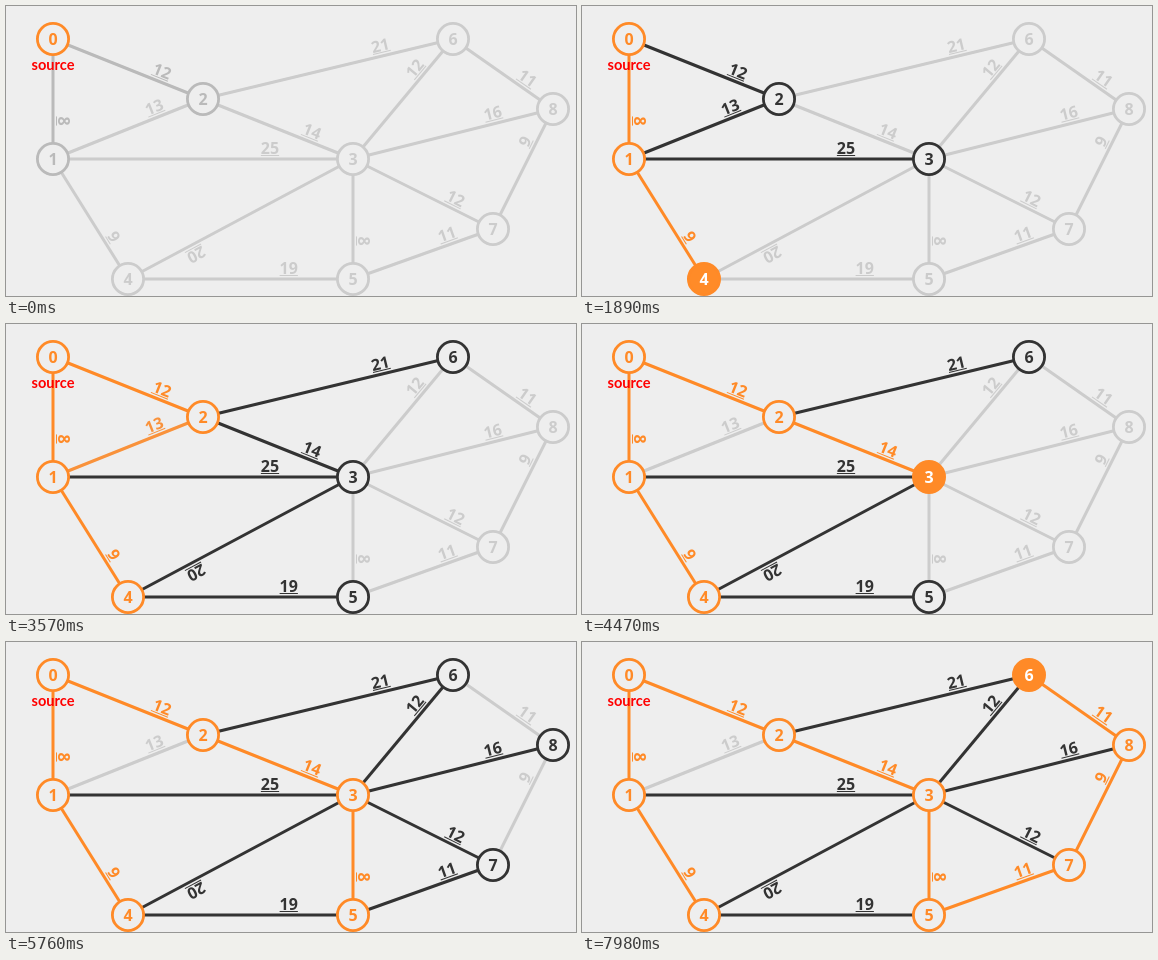
Animation of 570 by 290 pixels, one loop 8000 ms. Source, as an HTML page with a canvas:

```html
<!DOCTYPE html>
<html lang="en">
<head>
<meta charset="utf-8">
<title>Minimum spanning tree</title>
<style>
html, body { margin: 0; width: 100%; height: 100%; overflow: hidden; background: #eee; }
canvas { display: block; }
</style>
</head>
<body>
<canvas id="stage" width="570" height="290"></canvas>
<script>
const ctx = document.getElementById('stage').getContext('2d');
const LOOP = 8000, START = -92, STEP = 324.5, FADE = 300;
const DIGITS = '700 16px "Open Sans", "Noto Sans", sans-serif';
const CAPTION = '700 14.6px Lato, "Open Sans", sans-serif';

const BG = [238, 238, 238], WHITE = [255, 255, 255];
const GREY = [204, 204, 204], DARK = [51, 51, 51], ORANGE = [255, 138, 39];

// Each style is a list of colours: line, fill, text.
const STYLES = {
  off: [GREY, BG, GREY],
  on: [DARK, BG, DARK],
  hot: [ORANGE, BG, ORANGE],
  full: [ORANGE, ORANGE, WHITE]
};

// x, y, then the style changes by step
const nodes = [
  [47, 33, [[-9, 'hot']]],
  [47, 153, [[0, 'on'], [1, 'full'], [3, 'hot']]],
  [197, 93, [[0, 'on'], [7, 'full'], [9, 'hot']]],
  [347, 153, [[3, 'on'], [12, 'full'], [14, 'hot']]],
  [122, 273, [[3, 'on'], [4, 'full'], [6, 'hot']]],
  [347, 273, [[6, 'on'], [15, 'full'], [17, 'hot']]],
  [447, 33, [[9, 'on'], [24, 'full']]],
  [487, 223, [[14, 'on'], [18, 'full'], [20, 'hot']]],
  [547, 103, [[14, 'on'], [21, 'full'], [23, 'hot']]]
];

// from, to, weight, then the style changes by step
const edges = [
  [0, 1, 8, [[0, 'on'], [1, 'hot']]],
  [0, 2, 12, [[0, 'on'], [7, 'hot']]],
  [1, 2, 13, [[3, 'on'], [10, 'hot'], [11, 'off']]],
  [1, 3, 25, [[3, 'on']]],
  [1, 4, 9, [[3, 'on'], [4, 'hot']]],
  [2, 3, 14, [[9, 'on'], [12, 'hot']]],
  [2, 6, 21, [[9, 'on']]],
  [3, 4, 20, [[6, 'on']]],
  [3, 5, 8, [[14, 'on'], [15, 'hot']]],
  [3, 6, 12, [[14, 'on']]],
  [3, 7, 12, [[14, 'on']]],
  [3, 8, 16, [[14, 'on']]],
  [4, 5, 19, [[6, 'on']]],
  [5, 7, 11, [[17, 'on'], [18, 'hot']]],
  [6, 8, 11, [[23, 'on'], [24, 'hot']]],
  [7, 8, 9, [[20, 'on'], [21, 'hot']]]
];

const clamp = v => Math.max(0, Math.min(1, v));
const ease = p => p < 0.5 ? 4 * p ** 3 : 1 - (2 - 2 * p) ** 3 / 2;
const mix = (a, b, p) => a.map((v, i) => v + (b[i] - v) * p);
const css = c => `rgb(${c.map(Math.round).join(',')})`;

function coloursAt(changes, t) {
  let now = STYLES.off;
  for (const [step, name] of changes) {
    const p = ease(clamp((t - START - step * STEP) / FADE));
    now = now.map((c, i) => mix(c, STYLES[name][i], p));
  }
  return now.map(css);
}

function drawEdge([from, to, weight, changes], t) {
  const [x1, y1] = nodes[from], [x2, y2] = nodes[to];
  const length = Math.hypot(x2 - x1, y2 - y1);
  const [colour] = coloursAt(changes, t);
  ctx.save();
  ctx.translate(x1, y1);
  ctx.rotate(Math.atan2(y2 - y1, x2 - x1));
  ctx.fillStyle = colour;
  ctx.fillRect(0, -1.5, length, 3);
  ctx.translate(length * 0.75 - 8, 0);
  ctx.font = DIGITS;
  ctx.fillText(weight, 0, -5);
  const width = ctx.measureText(weight).width;
  ctx.fillRect(-width / 2, -4, width, 1);
  ctx.restore();
}

function drawNode([x, y, changes], id, t) {
  const [line, fill, text] = coloursAt(changes, t);
  ctx.beginPath();
  ctx.arc(x, y, 15.6, 0, Math.PI * 2);
  ctx.fillStyle = fill;
  ctx.fill();
  ctx.strokeStyle = line;
  ctx.lineWidth = 2.8;
  ctx.stroke();
  ctx.fillStyle = text;
  ctx.font = DIGITS;
  ctx.fillText(id, x, y + 5.5);
}

function draw(t) {
  ctx.fillStyle = css(BG);
  ctx.fillRect(0, 0, 570, 290);
  ctx.textAlign = 'center';
  edges.forEach(e => drawEdge(e, t));
  nodes.forEach((n, id) => drawNode(n, id, t));
  ctx.fillStyle = '#f00';
  ctx.font = CAPTION;
  ctx.fillText('source', 47, 64);
}

const begin = performance.now();
function tick() {
  draw((performance.now() - begin) % LOOP);
  requestAnimationFrame(tick);
}
tick();
</script>
</body>
</html>
```
